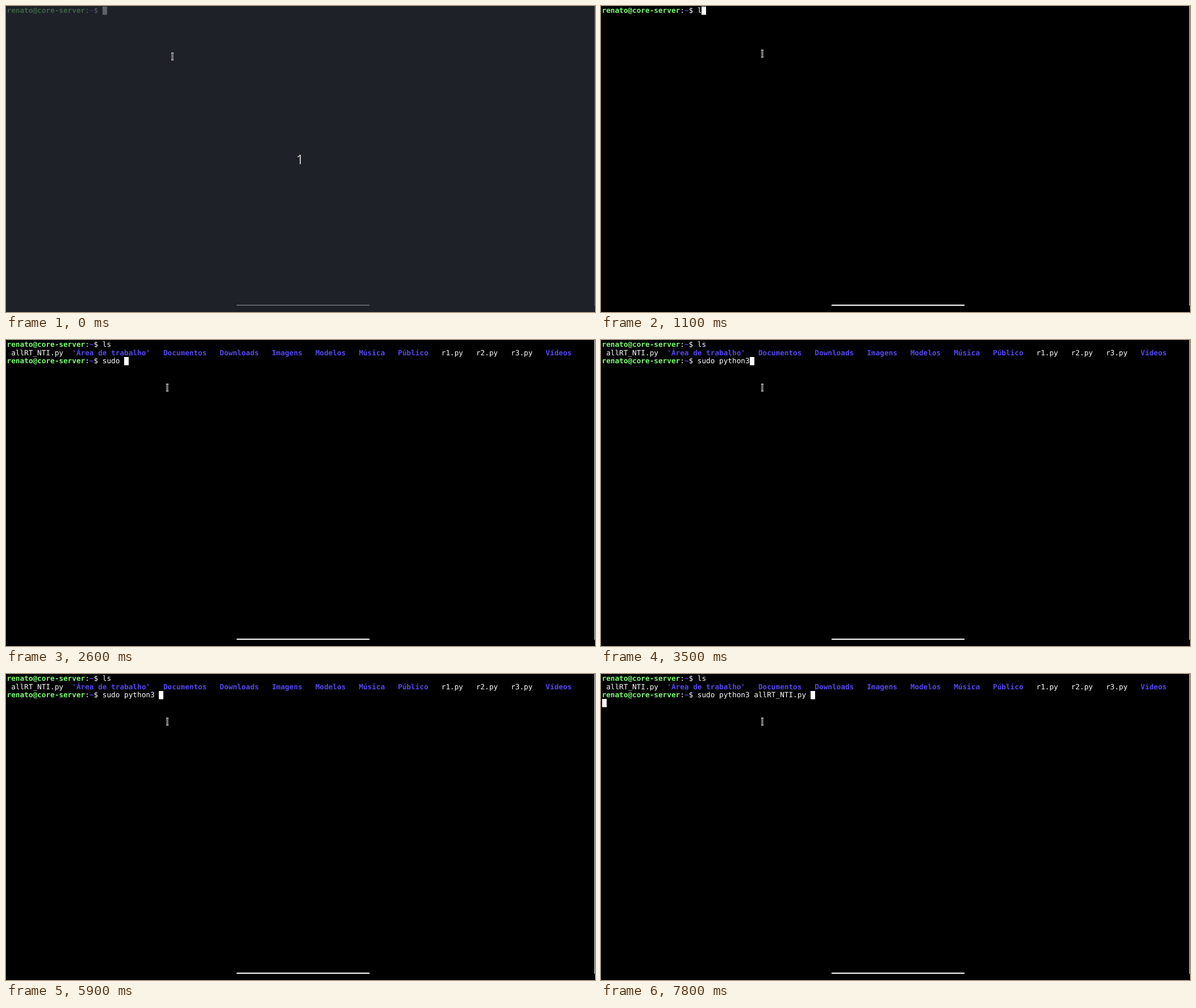
Animation, 1037 px wide and 540 px high, one loop 8000 ms. Source, as an HTML page with a canvas:

```html
<!DOCTYPE html>
<html lang="pt">
<head>
<meta charset="utf-8">
<title>Terminal</title>
<style>
  html, body { margin: 0; width: 100%; height: 100%; overflow: hidden; background: #000; }
  canvas { display: block; }
</style>
</head>
<body>
<canvas id="stage" width="1037" height="540"></canvas>
<script>
const ctx = document.getElementById('stage').getContext('2d');
const LOOP = 8000, LEFT = 1.5, TOP = 0.7, COL = 7.65, ROW = 14.5;
const GREEN = '#78ff6e', BLUE = '#5546f0', WHITE = '#fff';
const PROMPT_COLS = 22;

// Each entry holds from its time on.
const firstCommand = [[0, ''], [1100, 'l'], [1400, 'ls']];
const secondCommand = [
  [1500, ''], [2100, 's'], [2300, 'su'], [2500, 'sud'], [2600, 'sudo '],
  [2700, 'sudo p'], [3000, 'sudo py'], [3100, 'sudo pyt'], [3500, 'sudo python3'],
  [4300, 'sudo python3 '], [4600, 'sudo python3 A'], [5000, 'sudo python3 AL'],
  [5700, 'sudo python3 A'], [5900, 'sudo python3 '], [6000, 'sudo python3 a'],
  [6700, 'sudo python3 al'], [7100, 'sudo python3 allRT_NTI.py ']
];
const folders = ['Documentos', 'Downloads', 'Imagens', 'Modelos', 'Música', 'Público',
  'r1.py', 'r2.py', 'r3.py', 'Vídeos'];

const at = (steps, t) => steps.filter(([start]) => start <= t).pop()[1];

function rect(x, y, w, h, color) {
  ctx.fillStyle = color;
  ctx.fillRect(x, y, w, h);
}

// Writes on the terminal grid and returns the next free column.
function write(text, col, row, color = WHITE, bold = false) {
  ctx.font = `${bold ? 'bold ' : ''}12.7px "DejaVu Sans Mono", monospace`;
  ctx.fillStyle = color;
  [...text].forEach((ch, i) => ctx.fillText(ch, LEFT + (col + i) * COL, TOP + row * ROW + 11.3));
  return col + [...text].length;
}

function block(col, row) {
  rect(Math.round(LEFT + col * COL), Math.round(TOP + row * ROW), 8, 14.5, WHITE);
}

function commandLine(text, row, hasCursor) {
  write('renato@core-server', 0, row, GREEN, true);
  write(':', 18, row);
  write('~', 19, row, BLUE, true);
  write('$', 20, row);
  const end = write(text, PROMPT_COLS, row);
  if (hasCursor) block(end, row);
}

function listing(row) {
  write('allRT_NTI.py', 1, row);
  let col = write("'Área de trabalho'", 15, row, BLUE, true) + 3;
  for (const name of folders) {
    const isFile = name.endsWith('.py');
    col = write(name, col, row, isFile ? WHITE : BLUE, !isFile) + 3;
  }
}

function pointer(x, y) {
  const edge = '#c4c4c4';
  rect(x - 2, y - 7, 4, 2, edge);
  rect(x - 2, y + 5, 4, 2, edge);
  rect(x - 1.5, y - 6, 3, 12, edge);
  rect(x - 0.5, y - 6, 1, 12, '#222');
}

function countdown() {
  rect(0, 0, 1037, 540, 'rgba(41, 45, 54, 0.75)');
  ctx.font = '23px "Open Sans", sans-serif';
  ctx.fillStyle = '#d6d7d3';
  ctx.textAlign = 'center';
  ctx.fillText('1', 517.5, 279);
  ctx.textAlign = 'left';
}

function draw(t) {
  rect(0, 0, 1037, 540, '#000');
  rect(1036, 0, 1, 529, WHITE);
  rect(406, 527, 234, 2, WHITE);

  const listed = t >= 1500;
  commandLine(at(firstCommand, t), 0, !listed);
  if (listed) {
    listing(1);
    commandLine(at(secondCommand, t), 2, true);
    if (t >= 3300 && t < 3500) write('n3', 32, 2);
  }
  if (t >= 7800) block(0, 3);

  if (t < 100) countdown();
  if (t < 200) pointer(293, 89);
  else pointer(284, 84);
}

ctx.textRendering = 'geometricPrecision';
const start = performance.now();
function tick() {
  draw((performance.now() - start) % LOOP);
  requestAnimationFrame(tick);
}
tick();
</script>
</body>
</html>
```
